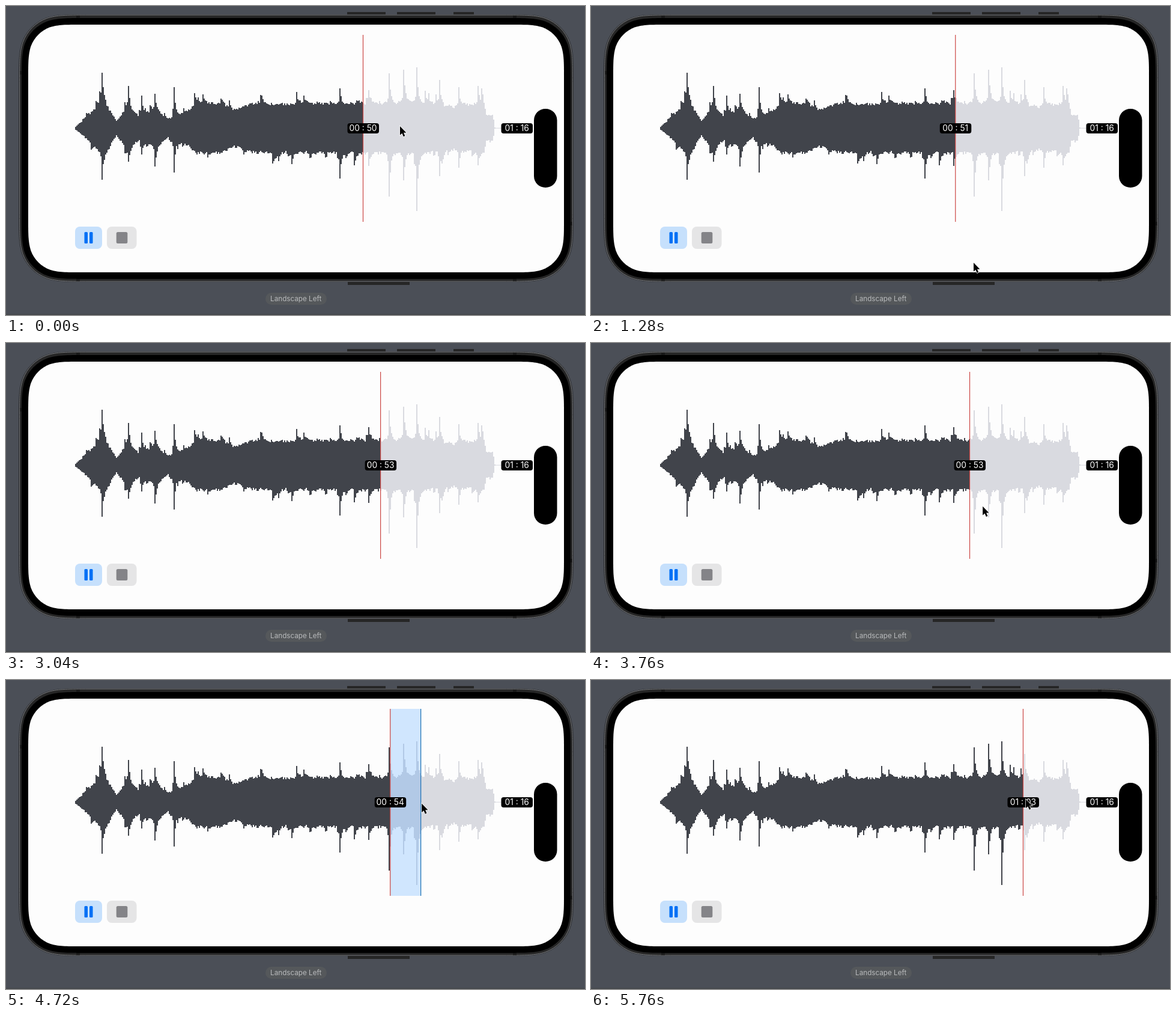
An HTML page for the animation above (5.84 s loop, 964 px wide and 514 px high).

```html
<!DOCTYPE html>
<html lang="en">
<head>
<meta charset="utf-8">
<title>Waveform player</title>
<style>
  html, body { margin: 0; width: 100%; height: 100%; overflow: hidden; background: #4b4f57; }
  svg { display: block; width: 964px; height: 514px; }
  text { font-family: Inter, "Liberation Sans", sans-serif; text-anchor: middle; }
  .time { font-size: 13.8px; fill: #fff; }
  .caption { font-size: 11.7px; fill: #b9bbbd; }
  .metal { fill: #262626; }
  .notch { fill: #191919; }
</style>
</head>
<body>
<svg viewBox="0 0 964 514">
  <defs>
    <clipPath id="played"><rect id="playedRect" x="100" y="40" width="495" height="330"/></clipPath>
  </defs>

  <rect width="964" height="514" fill="#4b4f57"/>
  <rect y="512" width="964" height="2" fill="#45484d"/>

  <g class="metal">
    <rect x="568" y="10" width="64" height="5"/>
    <rect x="651" y="10" width="64" height="5"/>
    <rect x="745" y="10" width="34" height="5"/>
    <rect id="sideButton" x="569" y="458" width="103" height="6"/>
  </g>
  <path id="shell" fill="#232426"/>
  <path id="rim" fill="#262626" stroke="#7a7c80"/>
  <g class="notch">
    <rect x="117" y="16" width="6" height="5"/>
    <rect x="844" y="16" width="6" height="5"/>
    <rect x="117" y="453" width="6" height="4.5"/>
    <rect x="844" y="453" width="6" height="4.5"/>
    <rect x="23" y="108" width="4" height="6"/>
    <rect x="939" y="359" width="4" height="6"/>
  </g>
  <path id="bezel" fill="#000"/>
  <path id="screen" fill="#fdfdfd"/>
  <rect x="879" y="171" width="38.5" height="131" rx="19"/>

  <rect x="812" y="202.7" width="14" height="1" fill="#d9dae0"/>
  <path id="waveRest" fill="#d9dae0"/>
  <path id="waveDone" fill="#41444b" clip-path="url(#played)"/>

  <g id="range" visibility="hidden">
    <rect id="rangeFill" y="48" height="311" fill="#007aff" fill-opacity=".18"/>
    <rect id="rangeEdge" y="48" width="1.2" height="311" fill="#1a6fb4"/>
  </g>

  <g id="head">
    <rect x="-.6" y="48" width="1.2" height="311" fill="#cb4643"/>
    <rect x="-26" y="195" width="52.5" height="17" rx="4"/>
    <text id="clock" class="time" x="0" y="208.2">00 : 50</text>
  </g>
  <rect x="824.5" y="195" width="52.5" height="17" rx="4"/>
  <text class="time" x="850.7" y="208.2">01 : 16</text>

  <rect x="115" y="367" width="45" height="37" rx="8" fill="#c6e0fc"/>
  <rect x="130.5" y="376" width="5.5" height="19" rx="1.5" fill="#0070f5"/>
  <rect x="139" y="376" width="5.5" height="19" rx="1.5" fill="#0070f5"/>
  <rect x="168" y="367" width="49.5" height="37" rx="8" fill="#e5e5e6"/>
  <rect x="183.7" y="376" width="18.6" height="19" rx="2.5" fill="#848488"/>

  <rect x="432" y="477" width="102" height="20" rx="10" fill="#55585b"/>
  <text class="caption" x="482.7" y="491">Landscape Left</text>

  <path id="cursor" d="M0 0V14.8L3.4 11.7L5.8 17.2L8.3 16.1L6 10.8H10.4Z"
        fill="#000" stroke="#fff" stroke-width="1.4" paint-order="stroke"/>
</svg>

<script>
const $ = id => document.getElementById(id);
const set = (id, attrs) => {
  for (const k in attrs) $(id).setAttribute(k, attrs[k]);
};

// Rounded rectangle with continuous corners, each turned a quarter further
function smoothRect(x, y, w, h, r) {
  const corner = (cx, cy, ux, uy) => {
    // (a, b): distances back along the incoming edge and along the outgoing one
    const at = (a, b) => `${cx - ux * a * r - uy * b * r} ${cy - uy * a * r + ux * b * r} `;
    return "L" + at(1.528, 0) +
      "C" + at(1.088, 0) + at(0.868, 0) + at(0.631, 0.075) +
      "C" + at(0.372, 0.169) + at(0.169, 0.372) + at(0.075, 0.631) +
      "C" + at(0, 0.868) + at(0, 1.088) + at(0, 1.528);
  };
  return ("M" + corner(x + w, y, 1, 0).slice(1)) + corner(x + w, y + h, 0, 1) +
    corner(x, y + h, -1, 0) + corner(x, y, 0, -1) + "Z";
}
const RADIUS = 57.6;
set("shell", { d: smoothRect(21, 14, 924, 445, RADIUS + 16) });
set("rim", { d: smoothRect(22.5, 15, 921, 443, RADIUS + 14.5) });
set("bezel", { d: smoothRect(26, 20, 914, 434, RADIUS + 11) });
set("screen", { d: smoothRect(37, 31, 892, 412, RADIUS) });

// Linear interpolation over rows of [key, ...values]
function sample(rows, key) {
  let i = 1;
  while (i < rows.length - 1 && rows[i][0] < key) i++;
  const [a, ...from] = rows[i - 1], [b, ...to] = rows[i];
  const u = Math.min(1, Math.max(0, (key - a) / (b - a)));
  return from.map((v, n) => v + (to[n] - v) * u);
}

let seed = 11;
const random = () => (seed = (seed * 16807) % 2147483647) / 2147483647;

// Loudness as [x, half height], accents as [x, above, below]
const loudness = [
  [115, 1], [140, 23], [163, 45], [184, 12], [203, 36], [221, 20], [250, 30],
  [270, 15], [302, 27], [315, 41], [360, 41], [378, 30], [410, 40], [550, 41],
  [690, 43], [745, 35], [795, 43], [800, 22], [811, 19], [814, 1]
];
const accents = [
  [160, 92, 86], [204, 70, 56], [226, 54, 44], [248, 57, 64], [280, 68, 74],
  [556, 66, 84], [637, 91, 114], [661, 97, 87], [684, 101, 138],
  [721, 80, 80], [754, 68, 66], [786, 70, 62]
];

function wavePath() {
  const gust = [0, 0];
  let d = "";
  for (let x = 115; x < 815; x += 2) {
    const [base] = sample(loudness, x + 1);
    const [up, down] = gust.map((g, side) => {
      gust[side] = random() < 0.1 ? 0.1 + 0.4 * random() : g * 0.55;
      let h = base * (0.93 + 0.14 * random() + gust[side]);
      for (const a of accents) {
        const n = Math.round((x - a[0]) / 2);
        const fall = n < 0 ? 0.15 ** -n : 0.42 ** n;
        h += Math.max(0, a[side + 1] - h) * fall;
      }
      return Math.max(0.5, Math.round(h));
    });
    d += `M${x} ${203 - up}h2v${up + down}h-2z`;
  }
  return d;
}
const wave = wavePath();
set("waveRest", { d: wave });
set("waveDone", { d: wave });

const LOOP = 5840, STEP = 80;
const ORIGIN = 115, RATE = 9.58;      // waveform start, pixels per second
const HELD = [10, 20, 41];            // ticks that repeat the previous picture
const HIDE = 1400, SHOW = 3360;       // pointer away
const DRAG = 4240, DROP = 5440;       // range selection
const leave = [[0, 656, 200], [240, 676, 285], [640, 637, 427]];
const enter = [
  [SHOW, 640, 411], [3920, 657, 216], [4400, 664, 208.5], [4560, 685, 206],
  [5120, 710, 204], [LOOP - STEP, 724, 198.5]
];
const bulge = [[1920, 0], [2080, 5], [2280, 5], [2480, 0]];

const pad = n => String(Math.floor(n)).padStart(2, "0");

function draw(t) {
  const dropped = t >= DROP;
  const from = dropped ? 716.4 - DROP / 1000 * RATE : 594.5;
  const head = from + t / 1000 * RATE;
  const secs = (head - ORIGIN) / RATE;
  $("clock").textContent = pad(secs / 60) + " : " + pad(secs % 60);
  set("head", { transform: `translate(${head} 0)` });
  set("playedRect", { width: head - 100 });

  const [cx, cy] = sample(t < SHOW ? leave : enter, t);
  const away = t >= HIDE && t < SHOW;
  set("cursor", {
    transform: `translate(${cx} ${cy})`,
    visibility: away ? "hidden" : "visible"
  });

  const dragging = t >= DRAG && !dropped;
  const edge = cx - 1.5;
  set("range", { visibility: dragging ? "visible" : "hidden" });
  set("rangeFill", { x: head, width: Math.max(0, edge - head) });
  set("rangeEdge", { x: edge - 0.6 });
  set("sideButton", { height: 6 + sample(bulge, t)[0] });
}

const start = performance.now();
function frame() {
  let tick = Math.floor(((performance.now() - start) % LOOP) / STEP);
  if (HELD.includes(tick)) tick--;
  draw(tick * STEP);
  requestAnimationFrame(frame);
}
frame();
</script>
</body>
</html>
```
